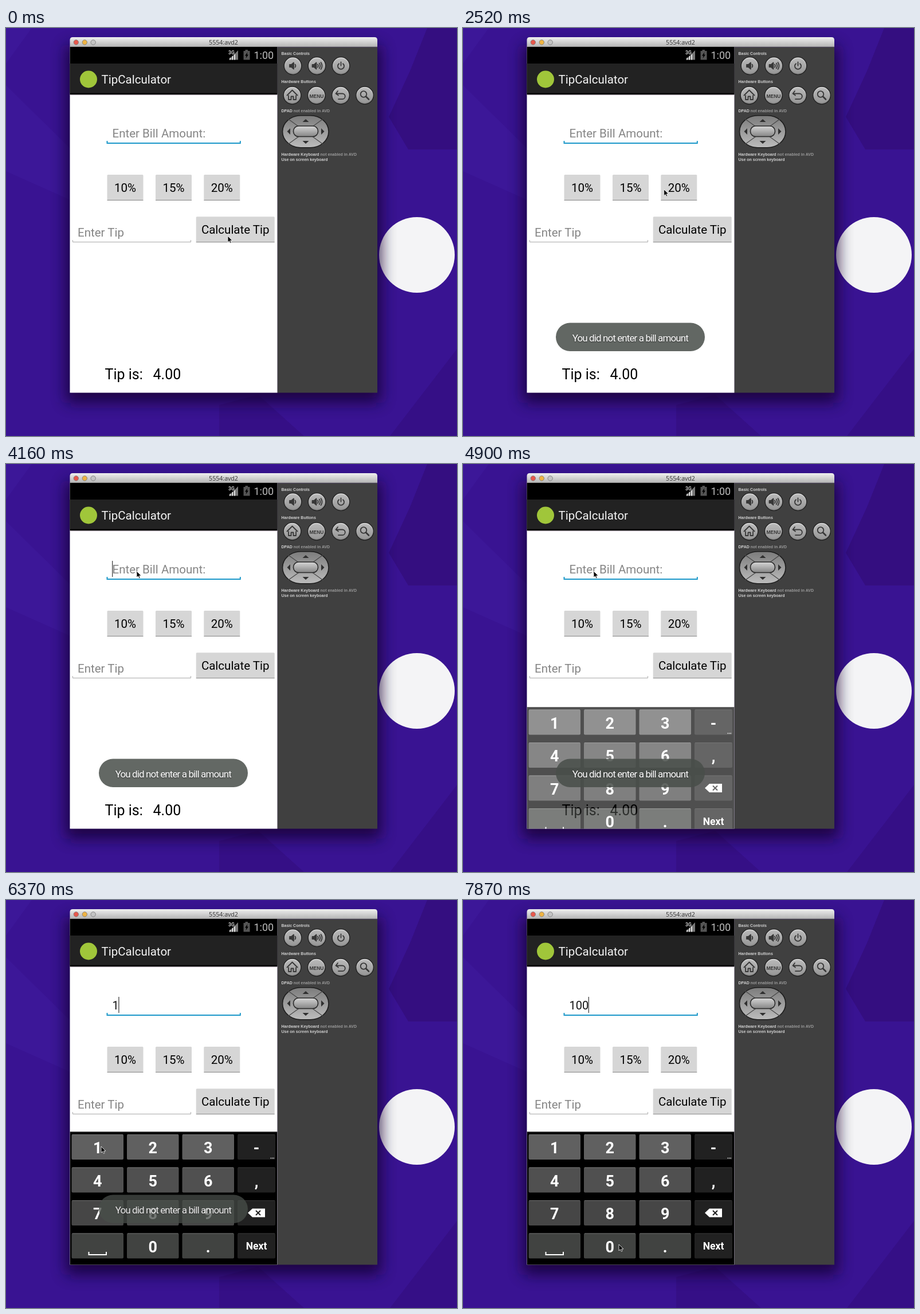
An HTML page that plays this animation: 787 by 712 pixels, repeating every 8000 ms.

```html
<!DOCTYPE html>
<html lang="en">
<head>
<meta charset="utf-8">
<title>Tip calculator</title>
<style>
html, body { margin: 0; width: 100%; height: 100%; overflow: hidden; background: #3a1291; }
svg { display: block; width: 100%; height: 100%; }
text { font-family: Roboto, sans-serif; white-space: pre; }
.ui { font-size: 20.5px; }
.hint { fill: #858585; }
.label { font: bold 7px "Liberation Sans", Arial, sans-serif; fill: #d0d0d0; }
.dim { fill: #9a9a9a; }
.key { font-weight: bold; font-size: 27px; fill: #fff; text-anchor: middle; }
.mid { text-anchor: middle; }
</style>
</head>
<body>
<svg viewBox="0 0 787 712" xmlns="http://www.w3.org/2000/svg">
  <defs>
    <linearGradient id="bar" x2="0" y2="1"><stop stop-color="#efefef"/><stop offset="1" stop-color="#b4b4b4"/></linearGradient>
    <linearGradient id="metal" x2="0" y2="1"><stop stop-color="#d6d6d6"/><stop offset="1" stop-color="#858585"/></linearGradient>
    <linearGradient id="pad" x2="0" y2="1"><stop stop-color="#7c7c7c"/><stop offset="1" stop-color="#bcbcbc"/></linearGradient>
    <filter id="blur" x="-20%" y="-20%" width="140%" height="140%"><feGaussianBlur stdDeviation="13"/></filter>
    <clipPath id="screen"><path d="M111.500 33H473.500V636.500H111.500z"/></clipPath>
  </defs>

  <g id="wall">
    <path fill="#391392" d="M0 0H787V712H0z"/>
    <path fill="#3c1798" d="M0 0H45L0 62zM0 100L112 210V300L0 250z"/>
    <path fill="#340e80" d="M735 0H787V212H702L668 155L705 75z"/>
    <path fill="#350f86" d="M372 658L440 640L520 712H372zM670 712L787 560V712z"/>
    <circle cx="717" cy="396" r="66" fill="#f4f4f6"/>
  </g>

  <rect x="104" y="30" width="551" height="624" rx="8" fill="#130433" opacity=".8" filter="url(#blur)"/>

  <g id="frame">
    <path fill="url(#bar)" d="M111.500 33V21q0-5 5-5H643q5 0 5 5V33z"/>
    <path stroke="#7c7c7c" d="M111.500 33H648"/>
    <g stroke="#777" stroke-width=".8">
      <circle cx="122.300" cy="25" r="4.200" fill="#e8584c"/>
      <circle cx="137.300" cy="25" r="4.200" fill="#efb443"/>
      <circle cx="152.200" cy="25" r="4.200" fill="#c4c4c4"/>
    </g>
    <text class="mid" x="379.500" y="28.500" fill="#333" style="font:10.6px 'Open Sans',sans-serif">5554:avd2</text>
    <path fill="#404040" d="M473.500 33.500H648V636.500H473.500z"/>
  </g>

  <g id="app">
    <path fill="#fff" d="M111.500 33H473.500V636.500H111.500z"/>
    <path d="M111.500 33H473.500V116.500H111.500z"/>
    <path fill="#222" d="M111.500 62H473.500V113.500H111.500z"/>
    <path stroke="#d9cdd9" d="M111.500 117H473.500"/>
    <text x="388" y="46" fill="#ccc" style="font-size:8.5px;font-weight:bold">3G</text>
    <path fill="#777" d="M389 55.500L405 39V55.500z"/>
    <path fill="#ddd" d="M390 55.500V53l2-2v4.500zM394 55.500V50l2-2v7.500zM398 55.500V47l2-2v10.500z"/>
    <path fill="#555" d="M414.500 40H417.500V38H422V40H425.500V55.500H414.500z"/>
    <path d="M421.500 42L417 48.500H419.500L418.500 53L423 46.500H420.500z"/>
    <text x="432.500" y="54" fill="#bdbdbd" font-size="18">1:00</text>
    <circle cx="144" cy="89.500" r="15" fill="#a0c63a"/>
    <text class="ui" x="166.500" y="96.500" fill="#f4f4f4">TipCalculator</text>
    <path fill="none" stroke="#1c98c9" stroke-width="2" d="M176.500 197V201H408.800V197"/>
    <path fill="none" stroke="#aaa" d="M116.500 370V373.500H322.500V370"/>
    <text class="ui hint" x="125" y="363.500">Enter Tip</text>
    <g id="buttons"></g>
    <text x="172.500" y="612.500" font-size="25">Tip is:</text>
    <text x="256.500" y="612.500" font-size="25">4.00</text>
    <text id="bill" class="ui" x="185.500" y="191"></text>
    <path id="caret" stroke="#333" stroke-width="1.200" d="M0 169V197"/>
  </g>

  <g id="panel">
    <text class="label" x="480.500" y="46.500">Basic Controls</text>
    <text class="label" x="480.500" y="95.500">Hardware Buttons</text>
    <text class="label" x="480.500" y="147">DPAD<tspan class="dim"> not enabled in AVD</tspan></text>
    <text class="label" x="480.500" y="223">Hardware Keyboard<tspan class="dim"> not enabled in AVD</tspan></text>
    <text class="label" x="480.500" y="231.500">Use on screen keyboard</text>
    <g id="knobs"></g>
    <g fill="none" stroke="#383838" stroke-width="1.800" stroke-linecap="round" stroke-linejoin="round">
      <path fill="#383838" d="M495 64H498L502 60.500V71.500L498 68H495z"/>
      <path d="M504.500 63.500q1.800 2.500 0 5"/>
      <path fill="#383838" d="M534.500 64H537.500L541.500 60.500V71.500L537.500 68H534.500z"/>
      <path d="M544 63.500q1.800 2.500 0 5M546.800 61.500q3 4.500 0 9M549.500 60q4 6 0 12"/>
      <path d="M581 62.200a5.500 5.500 0 1 0 7 0M584.500 59.500V65.500"/>
      <path d="M490.500 117.500L499.500 108.500L508.500 117.500M493 118V125H497.500V119.500H501.500V125H506V118"/>
      <path d="M579 110L575.500 114.500L580 117.500M576 114.500H587a4.800 4.800 0 0 1 0 9.600H580"/>
      <circle cx="624" cy="115.500" r="5.300"/>
      <path stroke-width="2.600" d="M628.500 120L633 124.500"/>
    </g>
    <text class="mid" x="542" y="121.500" fill="#383838" style="font:bold 8.5px 'Liberation Sans',sans-serif">MENU</text>
    <rect x="482.500" y="152.700" width="80.500" height="56" rx="32" ry="28" fill="url(#pad)" stroke="#1d1d1d" stroke-width="1.600"/>
    <path stroke="#484848" stroke-width="1.200" d="M492 158.500L553.500 203M553.500 158.500L492 203"/>
    <rect x="501.500" y="171" width="43" height="18.500" rx="9" fill="url(#metal)" stroke="#2a2a2a" stroke-width="1.600"/>
    <path fill="#303030" d="M517.500 164L523 159L528.500 164zM517.500 197L523 202L528.500 197zM496 175L490.500 180.500L496 186zM550 175L555.500 180.500L550 186z"/>
  </g>

  <g clip-path="url(#screen)">
    <g id="keys"></g>
    <g id="toast">
      <rect x="162" y="514.500" width="260" height="49.500" rx="24.700" fill="#494f4a" opacity=".86"/>
      <text class="mid" x="291.800" y="547" fill="#fff" style="font-size:17px;letter-spacing:-.9px;text-shadow:0 1px 2px #333">You did not enter a bill amount</text>
    </g>
  </g>
  <path id="mouse" stroke="#fff" stroke-width=".8" d="M0 0V11L2.600 8.700L4.300 12.400L6.100 11.500L4.500 8H8z"/>
</svg>

<script>
const LOOP = 8000, STEP = 148.3, START = 440;
const $ = id => document.getElementById(id);
const clamp = v => Math.max(0, Math.min(1, v));

function button(x, y, w, label) {
  return `<rect x="${x}" y="${y}" width="${w}" height="44.500" rx="1.500" fill="#d6d6d6"/>
    <path stroke="#858585" d="M${x} ${y + 44.5}h${w}"/>
    <text class="ui mid" x="${x + w / 2}" y="${y + 30}">${label}</text>`;
}

function knob([x, y]) {
  return `<circle cx="${x}" cy="${y}" r="15.300" fill="url(#metal)" stroke="#202020" stroke-width="1.300"/>
    <circle cx="${x}" cy="${y}" r="12.800" fill="#a4a4a4" opacity=".55"/>`;
}

const COLS = [114.5, 211, 307.5, 404];
const SHADES = ["#606060", "#505050", "#464646", "#414341"];

function key(label, i) {
  const col = i % 4, row = i >> 2, side = col === 3;
  const x = COLS[col], y = 409 + row * 57.5, w = side ? 66 : 90.5;
  const size = label === "Next" ? ' style="font-size:17.5px"' : "";
  const base = y + (label === "Next" ? 28.5 : 33);
  return `<rect ${label === "0" ? 'id="zero"' : ""} x="${x}" y="${y}" width="${w}" height="44" rx="2" fill="${side ? "#212121" : SHADES[row]}"/>
    <path stroke="${side ? "#3c3c3c" : "#7b7b7b"}" stroke-width=".8" d="M${x + 1} ${y + .5}h${w - 2}"/>
    <text class="key" x="${x + w / 2}" y="${base}"${size}>${label}</text>`;
}

$("buttons").innerHTML = button(176.5, 256, 63, "10%") + button(261, 256, 63, "15%") +
  button(345.3, 256, 63, "20%") + button(331.7, 329.2, 137, "Calculate Tip");
$("knobs").innerHTML = [[500.5, 66], [542.5, 66], [584.5, 66], [499.5, 117.5], [541.8, 117.5], [584, 117.5], [626, 117.5]].map(knob).join("");
$("keys").innerHTML = `<path d="M111.500 404.500H473.500V660H111.500z"/><path stroke="#333" d="M111.500 405H473.500"/>` +
  ["1", "2", "3", "-", "4", "5", "6", ",", "7", "8", "9", "", "", "0", ".", "Next"].map(key).join("") +
  `<path fill="#fff" d="M422 546L430 538.500H452V553.500H430z"/>
   <path stroke="#222" stroke-width="2" d="M436 542L444 550M444 542L436 550"/>
   <path fill="none" stroke="#fff" stroke-width="2" d="M144.500 614V619H175V614"/>
   <path stroke="#ddd" stroke-width="1.500" stroke-dasharray="1.500 1" d="M461.500 450.500H468.500"/>`;

// time, x, y of the pointer tip
const PATH = [[300, 387, 363], [1400, 203, 287], [1640, 203, 287], [2200, 290, 284], [2660, 369, 281],
  [3560, 369, 281], [4140, 228, 187], [5050, 228, 187], [5779, 188, 396], [6070, 166, 430],
  [6250, 166, 430], [6950, 272, 601]];
// fade-in start, fade-out start
const TOASTS = [[1467, 3489], [3850, 5461], [5960, 7470]];
const CARET = [[440, 1030], [1600, 2210], [2870, 3440], [4000, 4590], [5180, LOOP]];

const within = (t, spans) => spans.some(([a, b]) => t >= a && t < b);

function pointer(t) {
  const n = PATH.findIndex(p => p[0] > t);
  if (n === 0) return PATH[0].slice(1);
  if (n < 0) return PATH[PATH.length - 1].slice(1);
  const [a, ax, ay] = PATH[n - 1], [b, bx, by] = PATH[n];
  const u = (t - a) / (b - a), e = u * u * (3 - 2 * u);
  return [ax + (bx - ax) * e, ay + (by - ay) * e];
}

function draw(ms) {
  const t = ms < START ? 0 : START + Math.floor((ms - START) / STEP) * STEP;

  const typed = t > 7550 ? "100" : t > 7250 ? "10" : t > 6200 ? "1" : "";
  $("bill").textContent = typed || "Enter Bill Amount:";
  $("bill").style.fill = typed ? "#111" : "#858585";
  $("bill").style.fontSize = typed ? "20px" : "";
  $("caret").setAttribute("transform", `translate(${185.7 + typed.length * 11.2})`);
  $("caret").style.opacity = +within(t, CARET);

  const sliding = t < 5030;
  $("keys").style.display = t > 4880 ? "" : "none";
  $("keys").setAttribute("transform", `translate(0 ${sliding ? 19.5 : 0})`);
  $("keys").style.opacity = sliding ? .69 : 1;
  $("zero").setAttribute("fill", within(t, [[7250, 7400], [7550, 7700]]) ? "#8a8a8a" : SHADES[3]);

  $("toast").style.opacity = Math.max(...TOASTS.map(([a, b]) => clamp((t - a) / 300) * clamp(1 - (t - b) / 370)));
  $("mouse").setAttribute("transform", `translate(${pointer(t)})`);
}

const begin = performance.now();
function tick() {
  draw((performance.now() - begin) % LOOP);
  requestAnimationFrame(tick);
}
tick();
</script>
</body>
</html>
```
